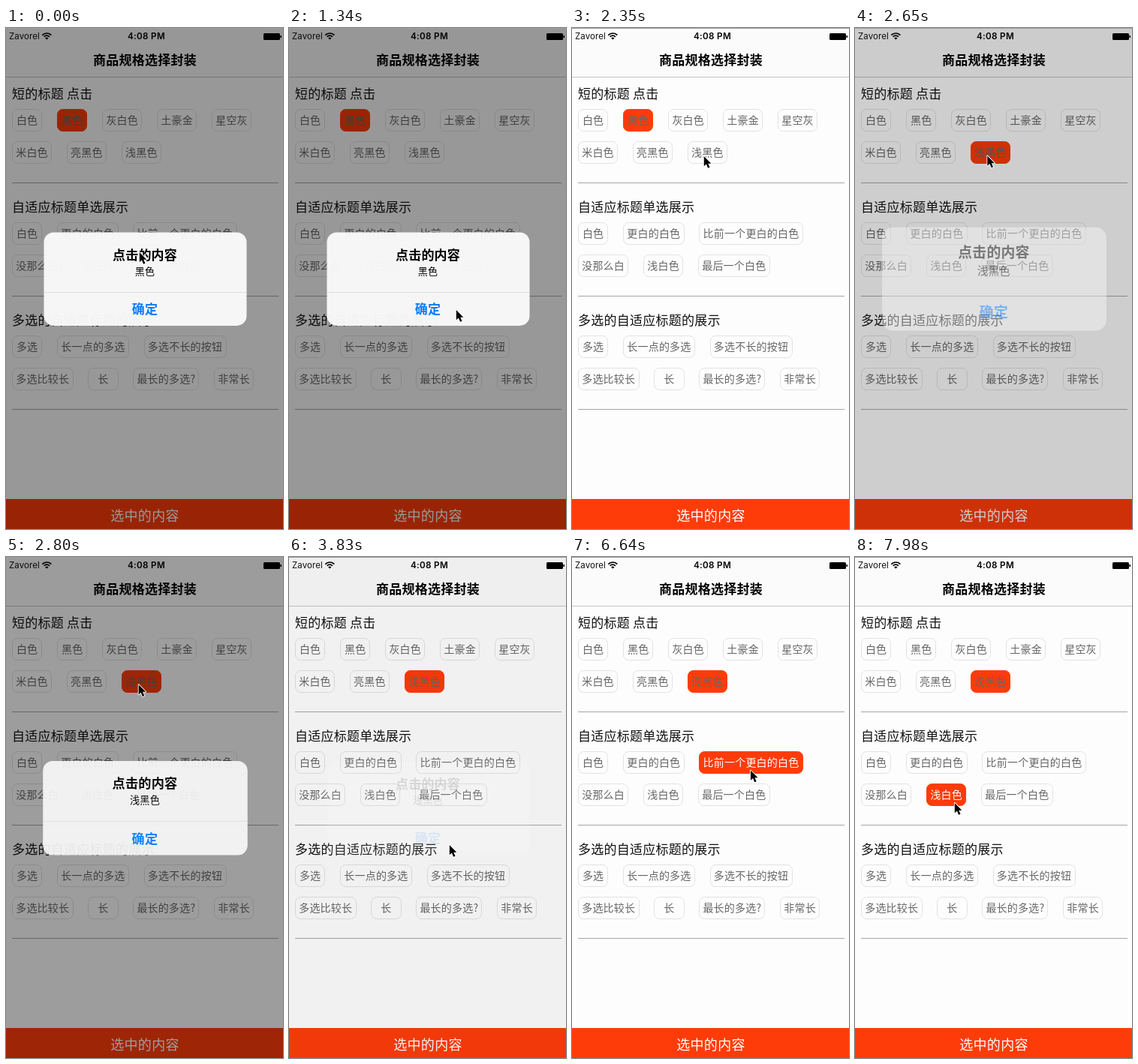
These frames come from a looping animation (369 by 668 pixels, 8000 ms). An HTML page with a canvas:

```html
<!DOCTYPE html>
<html lang="zh-CN">
<head>
<meta charset="utf-8">
<style>
html, body { margin: 0; width: 100%; height: 100%; overflow: hidden; background: #fdfdfd; }
canvas { display: block; }
</style>
</head>
<body>
<canvas id="stage" width="369" height="668"></canvas>
<script>
const ctx = document.getElementById('stage').getContext('2d');
const W = 369, H = 668, LOOP = 8000, STEP = 147.7, LEAD = 14;
const CJK = '"Noto Sans CJK SC", "Noto Sans CJK", sans-serif';
const ORANGE = '#fe3c09', PAGE = '#fdfdfd';

const sections = [
  { title: '短的标题 点击', rows: [['白色', '黑色', '灰白色', '土豪金', '星空灰'], ['米白色', '亮黑色', '浅黑色']], selectedText: '#666' },
  { title: '自适应标题单选展示', rows: [['白色', '更白的白色', '比前一个更白的白色'], ['没那么白', '浅白色', '最后一个白色']], selectedText: '#fff' },
  { title: '多选的自适应标题的展示', rows: [['多选', '长一点的多选', '多选不长的按钮'], ['多选比较长', '长', '最长的多选?', '非常长']] }
];

// Choices as [start time, label]; the latest one wins.
const choices = [
  [[0, '黑色'], [2573, '浅黑色']],
  [[0, ''], [4850, '更白的白色'], [6330, '比前一个更白的白色'], [7810, '浅白色']],
  [[0, '']]
];

// Pointer waypoints: time, x, y.
const path = [
  [0, 177, 298], [590, 222, 375], [1480, 222, 375], [2340, 175, 170],
  [2940, 176, 169], [3520, 213, 383], [3830, 213, 383], [4410, 118, 283],
  [5155, 118, 283], [5300, 121, 285], [5600, 152, 326], [6030, 257, 277],
  [6490, 257, 277], [7060, 130, 319], [7815, 130, 319], [7950, 132, 327]
];

function text(str, x, y, size, color, { align = 'center', weight = 400, font = CJK, spacing = size / 70 } = {}) {
  ctx.font = `${weight} ${size}px ${font}`;
  ctx.letterSpacing = spacing + 'px';
  ctx.textAlign = align;
  ctx.fillStyle = color;
  ctx.fillText(str, x, y + size * 0.38);
}

function rect(x, y, w, h, color) {
  ctx.fillStyle = color;
  ctx.fillRect(x, y, w, h);
}

function roundRect(x, y, w, h, r, fill, stroke) {
  ctx.beginPath();
  ctx.roundRect(x, y, w, h, r);
  if (fill) { ctx.fillStyle = fill; ctx.fill(); }
  if (stroke) { ctx.strokeStyle = stroke; ctx.lineWidth = 1; ctx.stroke(); }
}

function drawHeader() {
  rect(0, 0, W, 65, '#fbfbfb');
  rect(0, 65, W, 1, '#c4c4c4');
  const status = { font: 'Inter, sans-serif', spacing: 0.1 };
  text('Zavorel', 4, 11, 11.5, '#111', { ...status, align: 'left' });
  text('4:08 PM', 187, 11, 11.7, '#000', { ...status, weight: 600, spacing: 0.3 });

  ctx.strokeStyle = ctx.fillStyle = '#000';
  ctx.lineWidth = 1.7;
  for (const r of [5, 8.2]) {
    ctx.beginPath();
    ctx.arc(54.3, 15.2, r, -Math.PI * 0.76, -Math.PI * 0.24);
    ctx.stroke();
  }
  ctx.beginPath();
  ctx.moveTo(54.3, 15.6);
  ctx.arc(54.3, 15.6, 3, -Math.PI * 0.76, -Math.PI * 0.24);
  ctx.fill();

  roundRect(343, 7, 22, 9, 1.5, '#000');
  rect(365.5, 10, 1.5, 3, '#000');
  text('商品规格选择封装', 185, 43, 17, '#000', { weight: 600 });
}

function drawSection({ title, rows, selectedText }, top, selected) {
  text(title, 8, top + 22, 17, '#111', { align: 'left' });
  rows.forEach((labels, row) => {
    let x = 7.9;
    const y = top + 42 + row * 43;
    for (const label of labels) {
      const units = label.length - (label.endsWith('?') ? 0.55 : 0);
      const w = Math.max(40.4, 14.2 * units + 10.6);
      const left = Math.round(x), right = Math.round(x + w);
      const on = label === selected;
      roundRect(left + 0.5, y + 0.5, right - left - 1, 29, 7, on ? ORANGE : PAGE, on ? ORANGE : '#e2e2e2');
      text(label, x + w / 2, y + 15, 14, on ? selectedText : '#666');
      x += w + 19.7;
    }
  });
  rect(8, top + 140, 355, 1, '#a6a6a6');
}

function drawAlert(message, opacity, scale) {
  if (opacity < 0.004) return;
  ctx.save();
  ctx.globalAlpha = opacity;
  rect(0, 1, W, H, 'rgba(0,0,0,.4)');
  ctx.translate(185.5, 334.7);
  ctx.scale(scale, scale);
  roundRect(-135, -62.2, 270, 124.4, 13, 'rgba(249,249,249,.97)');
  rect(-135, 17.3, 270, 0.8, '#dadada');
  text('点击的内容', -0.5, -32.5, 17, '#000', { weight: 600 });
  text(message, -0.5, -10.5, 13, '#000');
  text('确定', -0.5, 40.3, 17, '#087cfb', { weight: 600 });
  ctx.restore();
}

function drawPointer(t) {
  const i = path.findLastIndex(p => p[0] <= t);
  const a = path[i], b = path[i + 1] || a;
  const u = b === a ? 0 : (t - a[0]) / (b[0] - a[0]);
  const e = u * u * (3 - 2 * u);
  ctx.save();
  ctx.translate(a[1] + (b[1] - a[1]) * e + 0.8, a[2] + (b[2] - a[2]) * e + 1);
  const arrow = new Path2D('M0 0V13.3L3.1 10.5L5.3 15.8L7.7 14.8L5.5 9.7H9.6Z');
  ctx.strokeStyle = '#fff';
  ctx.lineWidth = 1.8;
  ctx.lineJoin = 'round';
  ctx.stroke(arrow);
  ctx.fillStyle = '#000';
  ctx.fill(arrow);
  ctx.restore();
}

// Remainder of a critically damped spring released at `start`.
function spring(t, start) {
  const x = Math.max(0, t - start) * 0.022;
  return (1 + x) * Math.exp(-x);
}

function draw(t) {
  rect(0, 0, W, H, PAGE);
  drawHeader();
  sections.forEach((section, i) => {
    const [, selected] = choices[i].findLast(c => c[0] <= t);
    drawSection(section, 66 + i * 151, selected);
  });
  rect(0, 628, W, 40, ORANGE);
  text('选中的内容', 185, 650, 18, '#fff');

  if (t < 2573) {
    drawAlert('黑色', spring(t, 1424), 1);
  } else {
    const rest = spring(t, 2573);
    drawAlert('浅黑色', (1 - rest) * spring(t, 3657), 1 + 0.2 * rest);
  }
  rect(0, 0, W, 1, '#9c9c9c');
  drawPointer(t);
}

function frame() {
  const t = performance.now() % LOOP;
  draw(Math.max(0, Math.floor((t + LEAD) / STEP) * STEP - LEAD));
  requestAnimationFrame(frame);
}
frame();
</script>
</body>
</html>
```
